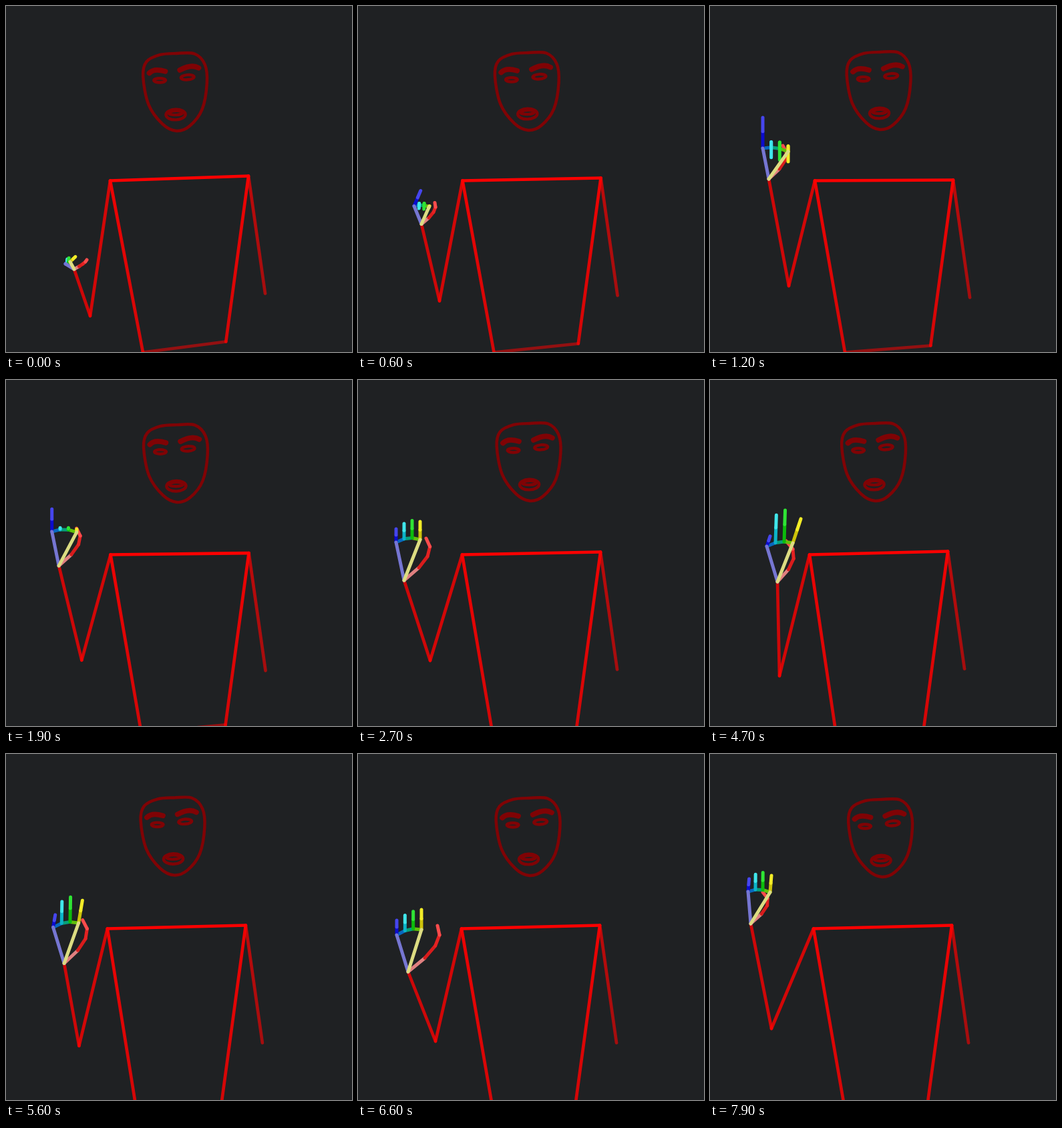
Recreate the animation shown at these times as an HTML page with a canvas. Size 518 by 518 pixels, loop 8000 ms.

```html
<!DOCTYPE html>
<html lang="en">
<head>
<meta charset="utf-8">
<title>Pose skeleton</title>
<style>
  html, body { margin: 0; width: 100%; height: 100%; overflow: hidden; background: #1f2123; }
  canvas { display: block; width: 518px; height: 518px; }
</style>
</head>
<body>
<canvas id="stage" width="518" height="518"></canvas>
<script>
const ctx = document.getElementById('stage').getContext('2d');
const LOOP = 8000, STEP = 100;

// Key poses. Index, pinky and thumb are offsets from the wrist; shoulder is x and tilt;
// fingers are the index, middle and pinky lengths, below zero when folded.
const POSES = [
  { at: 0, face: [253, 71], shoulder: [156, 7], hip: [49], elbow: [126, 464], wrist: [102, 394],
    index: [-6, -11], pinky: [-13, -8], thumb: [19, -14], fingers: [11, 6, 4], lean: [.8] },
  { at: 1200, face: [252.5, 69], shoulder: [157, 1], hip: [45], elbow: [118, 419], wrist: [88, 259],
    index: [29, -41], pinky: [-9, -46], thumb: [21, -50], fingers: [-15, -17, 46], lean: [0] },
  { at: 2700, face: [255.5, 65], shoulder: [156, 4], hip: [47], elbow: [108, 420], wrist: [69, 300],
    index: [24, -61], pinky: [-12, -57], thumb: [33, -63], fingers: [27, 26, 20], lean: [0] },
  { at: 3700, face: [252.5, 63], shoulder: [157, 4], hip: [40], elbow: [101, 448], wrist: [111, 307],
    index: [9, -61], pinky: [-11, -52], thumb: [-2, -55], fingers: [44, 53, 14], lean: [.27] },
  { at: 4700, face: [245, 65], shoulder: [149, 5], hip: [41], elbow: [104, 443], wrist: [101, 302],
    index: [23, -58], pinky: [-16, -53], thumb: [13, -61], fingers: [38, 47, 16], lean: [.32] },
  { at: 6600, face: [254.5, 66], shoulder: [155, 5], hip: [48], elbow: [116, 430], wrist: [75, 326],
    index: [20, -63], pinky: [-17, -55], thumb: [44, -69], fingers: [30, 26, 22], lean: [0] },
  { at: 7900, face: [255, 68], shoulder: [155, 5], hip: [48], elbow: [92, 411], wrist: [61, 254],
    index: [29, -47], pinky: [-4, -48], thumb: [18, -47], fingers: [25, 26, 19], lean: [.08] }
];
const FINGER_COLORS = [['#cdc30a', '#f3ec28'], ['#0cbc0c', '#2fe435'], ['#0cb4c8', '#40e6ea'], ['#0b0bcd', '#4646ee']];
const THUMB_COLORS = ['#e08080', '#d81c1c', '#e42222', '#fa4c4c'];
const LINK_COLORS = ['#62c00a', '#07a07a', '#0868bd'];
const OUTLINE = [[231, 73], [255, 71], [281, 71.5], [296, 87], [299, 114], [292, 152],
                 [274, 176], [255, 183], [235, 173], [215, 145], [207, 104], [212, 83]];

const clamp = v => Math.max(0, Math.min(1, v));
const mix = (a, b, k) => a.map((v, i) => v + (b[i] - v) * k);
const add = (a, b, k = 1) => [a[0] + b[0] * k, a[1] + b[1] * k];
const red = alpha => `rgba(255,0,0,${alpha})`;

function poseAt(t) {
  const next = POSES.findIndex((p, i) => i && (t < p.at || i === POSES.length - 1));
  const a = POSES[next - 1], b = POSES[next];
  const k = (t - a.at) / (b.at - a.at);
  const pose = {};
  for (const part in a) if (part !== 'at') pose[part] = mix(a[part], b[part], k);
  // The raised arm waves twice in the middle of the loop.
  const swing = t > 3700 && t < 5700 ? -17 * Math.sin(Math.PI * (t - 3700) / 1000) ** 2 : 0;
  pose.wrist[0] += swing;
  pose.elbow[0] += swing * 0.2;
  pose.drop = 248 + 20 * clamp((t - 1200) / 1500);
  return pose;
}

function line(a, b, color, width = 5) {
  ctx.beginPath();
  ctx.moveTo(...a);
  ctx.lineTo(...b);
  ctx.strokeStyle = color;
  ctx.lineWidth = width;
  ctx.stroke();
}
function limb(a, b, from, to = from) {
  const fade = ctx.createLinearGradient(...a, ...b);
  fade.addColorStop(0, red(from));
  fade.addColorStop(1, red(to));
  line(a, b, fade, 4.7);
}
// Smooth closed curve through all points
function closedCurve(points) {
  const n = points.length, at = i => points[(i + n) % n];
  ctx.beginPath();
  ctx.moveTo(...at(0));
  for (let i = 0; i < n; i++) {
    const slope = j => mix(at(j - 1), at(j + 1), 0.5).map((_, d) => (at(j + 1)[d] - at(j - 1)[d]) / 6);
    ctx.bezierCurveTo(...add(at(i), slope(i)), ...add(at(i + 1), slope(i + 1), -1), ...at(i + 1));
  }
  ctx.stroke();
}
function oval(x, y, rx, ry, tilt = 0) {
  ctx.beginPath();
  ctx.ellipse(x, y, rx, ry, tilt, 0, 2 * Math.PI);
  ctx.stroke();
}
function brow(from, bend, to) {
  ctx.beginPath();
  ctx.moveTo(...from);
  ctx.quadraticCurveTo(...bend, ...to);
  ctx.stroke();
}

function drawFace({ face: [x, top] }) {
  ctx.save();
  ctx.translate(x, top);
  ctx.scale(1.04, 1.035);
  ctx.translate(-253, -71);
  ctx.strokeStyle = '#800305';
  ctx.lineWidth = 4.3;
  closedCurve(OUTLINE);
  oval(231, 110, 8.5, 3.1);
  oval(271, 105.5, 9.5, 3.5, -0.08);
  oval(254, 159.5, 14, 7.5, -0.03);
  oval(254, 157, 10, 3, -0.03);
  ctx.lineWidth = 7.5;
  brow([216, 99.5], [223, 92], [239, 97]);
  brow([260, 95], [277, 86], [287, 92]);
  ctx.restore();
}

function drawBody({ shoulder: [x, tilt], hip: [inset], drop, elbow, wrist }) {
  const near = [x, 261.5], far = add(near, [207, -tilt]);
  const nearHip = add(near, [inset, drop + 9]);
  const farHip = add(far, [-0.136 * drop, drop]);
  limb(nearHip, farHip, 0.52);
  limb(far, add(far, [25, 176]), 0.7, 0.6);
  limb(near, nearHip, 0.92, 0.8);
  limb(far, farHip, 0.92, 0.8);
  limb(near, elbow, 0.8);
  limb(elbow, wrist, 0.78);
  limb(near, far, 1);
}

function drawHand({ wrist, index, pinky, thumb, fingers: [first, middle, last], lean: [lean] }) {
  const size = Math.hypot(...index) / 60;
  const lengths = [first, middle, middle * 0.88, last];
  const knuckles = lengths.map((_, i) => {
    const bow = i % 3 ? -3.5 * size : 0;
    return add(add(wrist, mix(index, pinky, i / 3)), [0, bow]);
  });

  const bend = [thumb[0] / 2 + 34 * size, thumb[1] / 2 - 8 * size];
  const thumbAt = k => add(add(wrist, bend, 2 * k * (1 - k)), thumb, k * k);
  THUMB_COLORS.forEach((c, i) => line(thumbAt(i / 4), thumbAt((i + 1) / 4), c));
  LINK_COLORS.forEach((c, i) => line(knuckles[i], knuckles[i + 1], c));

  for (let i = 3; i >= 0; i--) {
    const angle = lean * (i % 3 ? 0.1 : 1), length = lengths[i];
    const up = [Math.sin(angle), -Math.cos(angle)];
    const joint = add(knuckles[i], up, Math.abs(length) * 0.55);
    const tip = add(knuckles[i], up, length);
    line(knuckles[i], joint, FINGER_COLORS[i][0]);
    line(joint, tip, FINGER_COLORS[i][1]);
  }
  line(wrist, knuckles[3], '#7676d2');
  line(wrist, knuckles[0], '#dcdc82');
}

function draw(now) {
  const pose = poseAt(Math.floor((now % LOOP) / STEP) * STEP);
  ctx.fillStyle = '#1f2123';
  ctx.fillRect(0, 0, 518, 518);
  ctx.lineCap = ctx.lineJoin = 'round';
  drawFace(pose);
  drawBody(pose);
  drawHand(pose);
}

const start = performance.now();
function tick() {
  draw(performance.now() - start);
  requestAnimationFrame(tick);
}
tick();
</script>
</body>
</html>
```
